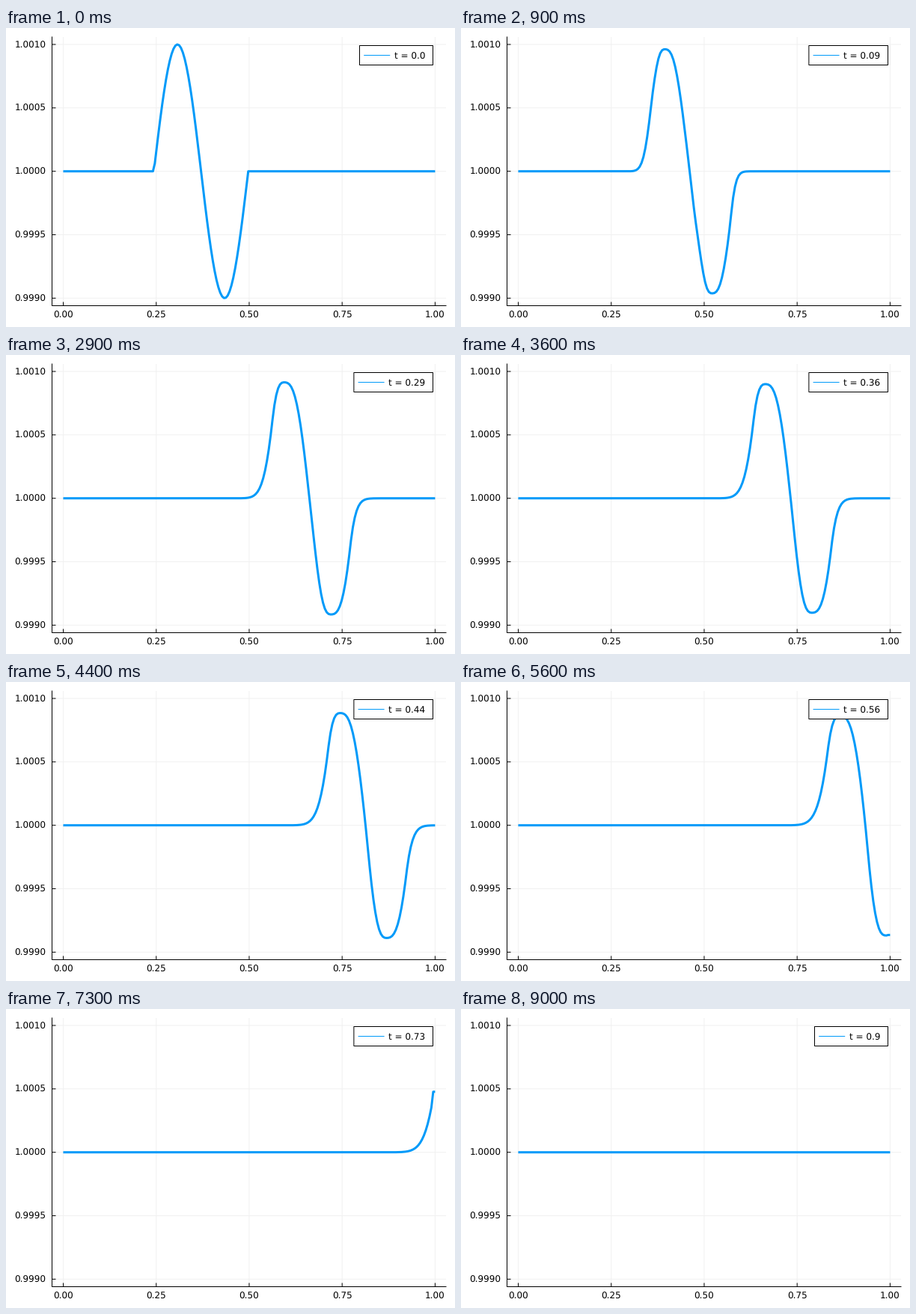
Recreate the animation shown at these times as a matplotlib script. Size 600x400 px, loop 9100 ms.

```python
import numpy as np
import matplotlib.pyplot as plt
from matplotlib.animation import FuncAnimation
from matplotlib.patches import Rectangle

W, H = 600, 400
FRAMES, INTERVAL = 91, 100
N = 200                        # grid points
STEPS, CFL = 10, 0.1993        # solver steps per frame, Courant number
BLUE = "#009af9"
FONT = 12
DIGIT = 0.636 * FONT           # advance width of one digit

LEFT, RIGHT, TOP, BOTTOM = 61.5, 588, 12, 371.5
X0, X1 = 76.5, 573.4           # pixels of x = 0 and x = 1
Y0, AMP = 191.7, 169.7         # pixel of y = 1 and pixels per 0.001


def minmod(a, b):
    return np.where(a * b > 0, np.sign(a) * np.minimum(abs(a), abs(b)), 0.0)


def rate(u):
    """Upwind finite-volume advection with limited linear reconstruction."""
    d = np.diff(u)
    flux = u.copy()
    flux[1:-1] += minmod(d[:-1], d[1:]) / 2
    out = np.zeros_like(u)
    out[1:] = -np.diff(flux)
    return out


def euler(u):
    v = u + CFL * rate(u)
    v[-1] = v[-2]              # open right boundary
    return v


def solve():
    i = np.arange(N)
    inside = (i > 48.5) & (i < 99.5)
    u = np.where(inside, np.sin(2 * np.pi * (i - 48.5) / 50.5), 0.0)
    waves = [u]
    for _ in range(FRAMES - 1):
        for _ in range(STEPS):
            u = (u + euler(euler(u))) / 2
        waves.append(u)
    return waves


plt.rcParams.update({"font.family": "DejaVu Sans", "font.size": FONT,
                     "text.hinting": "none", "path.snap": False})
fig = plt.figure(figsize=(W / 72, H / 72), dpi=72, facecolor="white")
ax = fig.add_axes([0, 0, 1, 1])
ax.set(xlim=(0, W), ylim=(H, 0))
ax.axis("off")


def line(xs, ys, color="black", lw=1, z=3, cap="butt"):
    return ax.plot(xs, ys, color=color, lw=lw, zorder=z, solid_capstyle=cap,
                   solid_joinstyle="round")[0]


GRID = "#f1f1f1"
for k in range(5):
    x = X0 + (X1 - X0) * k / 4
    line([x, x], [TOP, BOTTOM], GRID, z=1)
    line([x, x], [BOTTOM, BOTTOM - 5])
    ax.text(x - 1.75 * DIGIT, 387.4, f"{k / 4:.2f}")

    y = Y0 + AMP * (k - 2) / 2
    line([LEFT, RIGHT], [y, y], GRID, z=1)
    line([LEFT, LEFT + 5], [y, y])
    ax.text(11.3, y + 4.4, f"{1.001 - k * 0.0005:.4f}")

line([LEFT, LEFT], [TOP, BOTTOM], cap="projecting")
line([LEFT, RIGHT], [BOTTOM, BOTTOM], cap="projecting")

curve = line([], [], BLUE, 3, 4)
box = Rectangle((0, 23.5), 1, 26, fc="white", ec="black", lw=1, zorder=5)
ax.add_patch(box)
sample = line([], [], BLUE, 1, 6)
label = ax.text(0, 42, "", zorder=6)

px = np.linspace(X0, X1, N)
waves = solve()


def draw(n):
    curve.set_data(px, Y0 - AMP * waves[n])
    text = f"t = {round(n / 100, 2)}"
    left = 472.5 - DIGIT * (len(text) - 7)
    box.set_x(left)
    box.set_width(570.5 - left)
    sample.set_data([left + 5.7, left + 40.7], [36.5, 36.5])
    label.set_text(text)
    label.set_x(left + 46.3)
    return curve, box, sample, label


anim = FuncAnimation(fig, draw, frames=FRAMES, interval=INTERVAL, repeat=True,
                     repeat_delay=0, blit=False)
plt.show()
```
